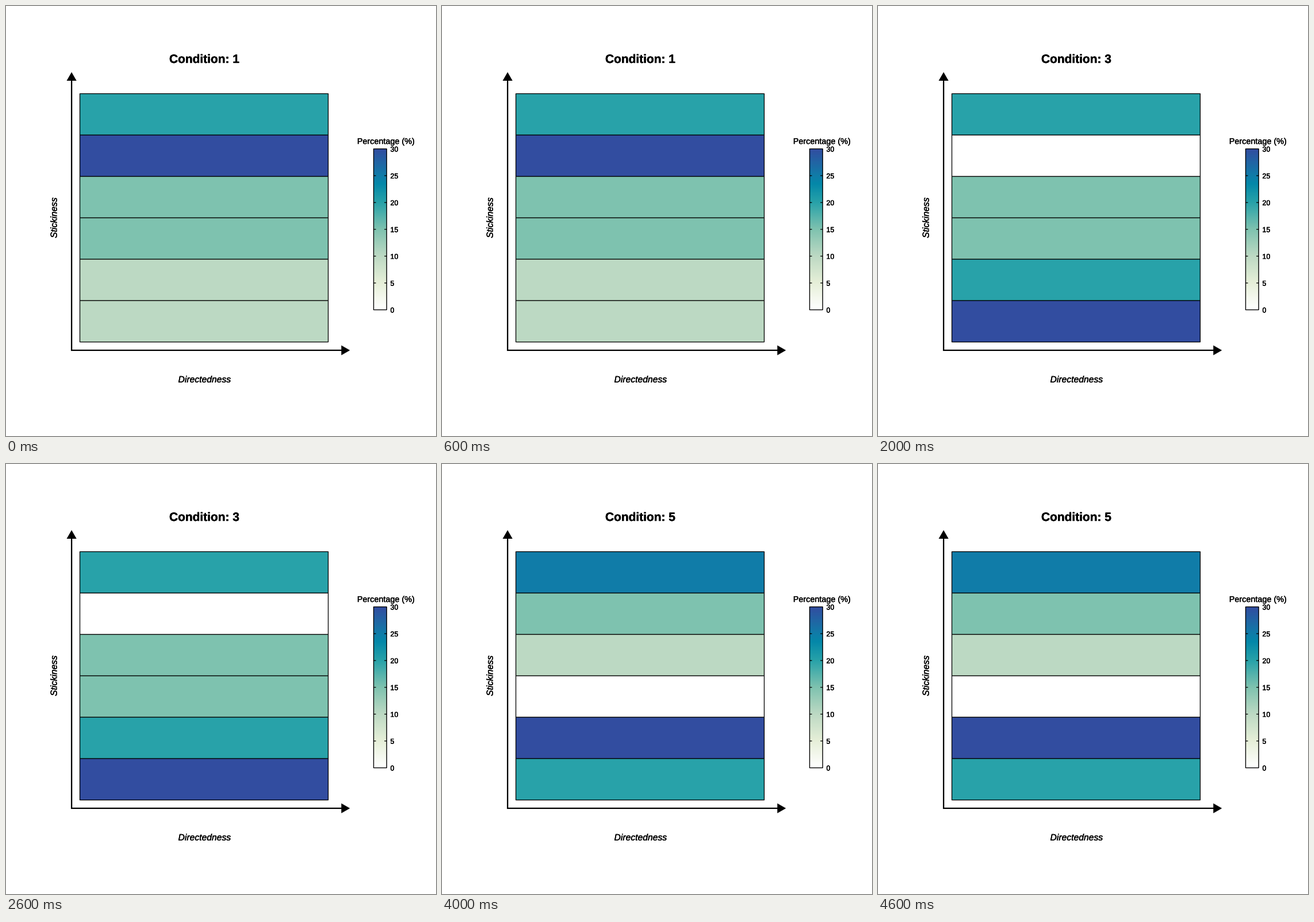
A matplotlib script for the animation above (5000 ms loop, 748x748 px).

```python
import matplotlib.pyplot as plt
import numpy as np
from matplotlib.animation import FuncAnimation
from matplotlib.colors import LinearSegmentedColormap
from matplotlib.patches import Polygon, Rectangle
from matplotlib.patheffects import withStroke

SIZE, DPI = 748, 88
PT = 72 / DPI  # points per pixel

COLORS = {
    0: "#FFFFFF", 5: "#E6EFD8", 10: "#BCD9C3", 15: "#7EC2AF",
    20: "#28A2A9", 23.5: "#0488A8", 25: "#107CA8", 30: "#324DA0",
}

# percentages from the top row to the bottom row, one list per condition
CONDITIONS = [
    [20, 30, 15, 15, 10, 10],
    [25, 5, 0, 25, 20, 25],
    [20, 0, 15, 15, 20, 30],
    [15, 10, 25, 10, 10, 30],
    [25, 15, 10, 0, 30, 20],
]

plt.rcParams["font.family"] = "Liberation Sans"
fig = plt.figure(figsize=(SIZE / DPI, SIZE / DPI), dpi=DPI, facecolor="white")
ax = fig.add_axes([0, 0, 1, 1])
ax.axis("off")


def label(x, y, text, px, ha="center", **kw):
    # drawn as outlines with a hairline stroke, so spacing is not rounded
    ink = [withStroke(linewidth=0.4 * PT, foreground="black")]
    return ax.text(x, y, text, fontsize=px * PT, ha=ha, va="baseline",
                   color="black", path_effects=ink, **kw)


def line(xs, ys, px):
    ax.plot(xs, ys, color="black", lw=px * PT, solid_capstyle="butt",
            snap=False)


def box(x, y, w, h, px, **kw):
    return ax.add_patch(Rectangle((x, y), w, h, ec="black", lw=px * PT,
                                  snap=False, **kw))


# heat map rows
LEFT, TOP, WIDTH, ROW = 128.5, 152.5, 432, 72
rows = [box(LEFT, TOP + i * ROW, WIDTH, ROW, 1.3, fc="white")
        for i in range(6)]

# axes with arrow heads, a fifth of a row away from the map
AX, AY = LEFT - ROW / 5, TOP + 6 * ROW + ROW / 5
line([AX, AX], [AY + 1.1, 125], 2.3)
line([AX - 1.1, 590], [AY, AY], 2.3)
for head in ([(AX, 115), (AX - 8.6, 130), (AX + 8.6, 130)],
             [(598.3, AY), (583.3, AY - 8.6), (583.3, AY + 8.6)]):
    ax.add_patch(Polygon(head, fc="black", ec="none"))

# colour bar
BX, BY, BW, BH = 639.5, 248.5, 22.7, 280
cmap = LinearSegmentedColormap.from_list(
    "scale", [(v / 30, c) for v, c in COLORS.items()], N=512)
ax.imshow(np.linspace(1, 0, 280)[:, None], cmap=cmap, vmin=0, vmax=1,
          extent=(BX, BX + BW, BY + BH, BY), aspect="auto",
          interpolation="nearest")
ax.set_xlim(0, SIZE)
ax.set_ylim(SIZE, 0)
box(BX, BY, BW, BH, 1.4, fill=False)
for v in range(0, 31, 5):
    y = BY + BH * (1 - v / 30)
    if 0 < v < 30:
        line([BX, BX + 4], [y, y], 1.3)
        line([BX + BW - 4, BX + BW], [y, y], 1.3)
    label(668.5, y + 4.8, str(v), 12.5, ha="left")

# texts
label(610.8, 240, "Percentage (%)", 14.4, ha="left")
label(345.5, 654.7, "Directedness", 15.7, style="italic")
label(88.5, 368.3, "Stickiness", 15.7, style="italic", rotation=90,
      rotation_mode="anchor")
title = label(284, 99, "", 20.9, ha="left", weight="bold")


def draw(i):
    title.set_text(f"Condition: {i + 1}")
    for row, value in zip(rows, CONDITIONS[i]):
        row.set_facecolor(COLORS[value])
    return [title, *rows]


anim = FuncAnimation(fig, draw, frames=len(CONDITIONS), interval=1000,
                     repeat=True, repeat_delay=0, blit=False)
plt.show()
```
